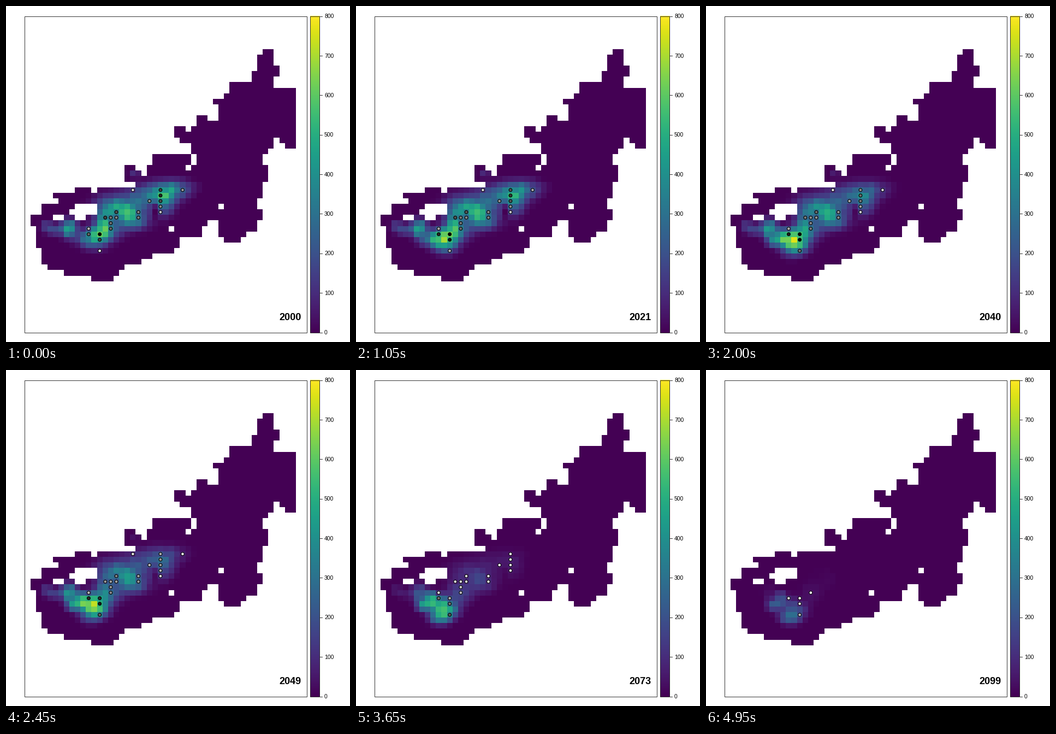
A matplotlib script that plays this animation: 630 px wide and 615 px high, repeating every 5 s.

```python
import numpy as np
import matplotlib.pyplot as plt
from matplotlib.animation import FuncAnimation
from matplotlib.patches import Rectangle
from matplotlib.path import Path

W, H, DPI = 630, 615, 100
PX = 72 / DPI
ROWS, COLS = 42, 48
X0, Y0, CELL = 45.15, 78.7, 10.12
TOP, BOTTOM = 18.6, 597.6
FIRST_YEAR, YEARS = 2000, 100
PACE = 11          # years a lobe takes to grow or fade
PRESENCE = 42      # density below which a site is lost

# Key points of the coast, in grid cells, clockwise from the north tip
COAST = [
    (41.9, 0), (44, 0), (44, 2.2), (45.3, 4), (44, 6), (44, 7), (48, 7),
    (48, 18), (46, 18), (44, 15.9), (43.4, 18), (42, 20), (43.2, 22),
    (41.7, 27), (41, 28), (42, 30), (41, 32), (41, 33), (39, 33), (38, 35),
    (35, 35), (34, 33.6), (34, 31), (32, 31), (31, 32.6), (31, 34), (27, 34),
    (27.2, 35.4), (25.8, 37), (22.2, 37), (19.8, 39), (17, 39), (15, 42),
    (13.5, 42), (3.5, 40), (2.2, 39), (0, 30), (2, 30), (2, 28), (5, 28),
    (4, 26), (8, 26), (8, 25), (19, 25), (19, 24), (17, 24), (17, 21),
    (19, 21), (20.4, 23), (21, 23), (21, 21), (22, 21), (22, 19), (29, 19),
    (29, 17), (27, 17), (26, 15.8), (26, 14), (30, 14), (30, 12), (34, 12),
    (33.1, 9), (34.6, 9), (36, 7.6), (36, 6), (39.9, 6),
]
# Lakes: column, row, width, height
LAKES = [(8, 28, 4, 1), (7, 29, 5, 1), (8, 30, 2, 1), (4, 30, 2, 1),
         (11, 25, 1, 1), (25, 32, 1, 1), (34, 28, 1, 1), (28, 21, 1, 1),
         (29, 19, 1, 2), (28, 14, 1, 1), (32, 12, 2, 1)]

# Lobes: column, row, spreads, peak, years of growth and of decline
LOBES = [
    (24.5, 25.4, 1.9, 1.2, 300, 1900, 2042),
    (26.2, 24.5, 2.2, 1.0, 160, 1900, 2035),
    (21.3, 25.7, 2.0, 1.3, 240, 1900, 2053),
    (23.6, 27.6, 1.2, 1.3, 250, 1900, 2055),
    (22.0, 28.2, 0.6, 1.2, -200, 1900, 2050),
    (18.2, 22.0, 0.6, 0.5, 140, 1900, 2045),
    (14.8, 28.2, 2.2, 1.2, 270, 1900, 2056),
    (17.3, 29.6, 1.0, 1.2, 260, 1900, 2067),
    (17.5, 28.0, 3.8, 2.1, 210, 1900, 2064),
    (18.5, 30.8, 1.5, 1.0, 180, 1900, 2065),
    (12.6, 31.0, 0.9, 1.6, 330, 1900, 2045),
    (14.3, 32.0, 1.5, 1.5, 200, 1900, 2085),
    (11.7, 33.0, 1.3, 1.1, 460, 1900, 2056),
    (6.5, 32.0, 1.0, 1.1, 440, 1900, 2073),
    (3.8, 32.2, 1.2, 0.7, 180, 1900, 2065),
    (2.3, 31.4, 0.7, 0.6, 140, 1900, 2070),
    (9.7, 33.9, 1.2, 1.0, 540, 2002, 2087),
    (11.5, 35.2, 1.4, 1.0, 500, 2020, 2090),
    (7.3, 34.2, 0.9, 0.8, 460, 2032, 2100),
    (8.5, 32.5, 0.6, 0.6, 420, 2045, 2095),
    (10.2, 36.6, 1.3, 0.8, 500, 2058, 2102),
]

# Sites: column -> rows
SITES = {10: (32, 33), 12: (33, 34, 36), 13: (30,), 14: (30, 31, 32),
         15: (29, 30), 18: (25,), 19: (29, 30), 21: (27,), 22: (29,),
         23: range(25, 30), 27: (25,)}

rows, cols = np.mgrid[:ROWS, :COLS]


def land_mask():
    centres = np.column_stack([cols.ravel() + 0.5, rows.ravel() + 0.5])
    land = Path(COAST + COAST[:1]).contains_points(centres).reshape(ROWS, COLS)
    for c, r, w, h in LAKES:
        land[r:r + h, c:c + w] = False
    return land


def logistic(years):
    return 1 / (1 + np.exp(-years / PACE))


cx, cy, sx, sy, peak, growth, decline = np.array(LOBES).T[:, :, None, None]
shapes = peak * np.exp(-((cols - cx) / sx) ** 2 / 2 - ((rows - cy) / sy) ** 2 / 2)
land = land_mask()
noise = np.random.default_rng(4).normal(1, 0.08, (ROWS, COLS))

site_col, site_row = np.array([(c, r) for c, rs in SITES.items() for r in rs]).T


def density(year):
    strength = logistic(year - growth) * logistic(decline - year)
    return (shapes * strength).sum(axis=0)


def heat_values(total):
    return np.ma.masked_where(~land, np.clip(total * noise - 12, 0, 800))


def edges(start, count):
    return np.round(start + CELL * np.arange(count + 1))


plt.rcParams["font.family"] = "Liberation Sans"
fig = plt.figure(figsize=(W / DPI, H / DPI), dpi=DPI, facecolor="white")
ax = fig.add_axes([0, 0, 1, 1])
ax.axis("off")

heat = ax.pcolormesh(edges(X0, COLS), edges(Y0, ROWS),
                     heat_values(density(FIRST_YEAR)), cmap="viridis",
                     vmin=0, vmax=800, antialiased=False, edgecolors="none")
ax.imshow(np.linspace(1, 0, 256)[:, None], extent=(557, 575, 598, 18),
          cmap="viridis", interpolation="nearest", aspect="auto")
for left, right in ((34.4, 551), (557, 574)):
    ax.add_patch(Rectangle((left, TOP), right - left, BOTTOM - TOP,
                           fill=False, ec="#222222", lw=0.9 * PX))

for value in range(0, 801, 100):
    y = BOTTOM + (TOP - BOTTOM) * value / 800
    ax.plot([575, 579], [y, y], color="#222222", lw=0.9 * PX)
    ax.text(583, y + 3.6, str(value), size=10.4 * PX, va="baseline")

dots = ax.scatter(X0 + (site_col + 0.5) * CELL, Y0 + (site_row + 0.5) * CELL,
                  s=(5.8 * PX) ** 2, lw=1.1 * PX, zorder=3)
label = ax.text(540.7, 575.3, "", size=18 * PX, weight="bold",
                ha="right", va="baseline")
ax.set_xlim(0, W)
ax.set_ylim(H, 0)


def draw(i):
    year = FIRST_YEAR + i
    total = density(year)
    heat.set_array(heat_values(total))

    # Dense sites are dark, sparse ones white, lost ones hidden
    local = total[site_row, site_col]
    tone = np.clip(1.05 - local / 560, 0, 1)
    shown = (local > PRESENCE).astype(float)
    black = np.zeros_like(tone)
    dots.set_facecolors(np.column_stack([tone, tone, tone, shown]))
    dots.set_edgecolors(np.column_stack([black, black, black, shown]))
    label.set_text(str(year))
    return heat, dots, label


anim = FuncAnimation(fig, draw, frames=YEARS, interval=50, repeat=True,
                     repeat_delay=0, blit=False)
plt.show()
```
